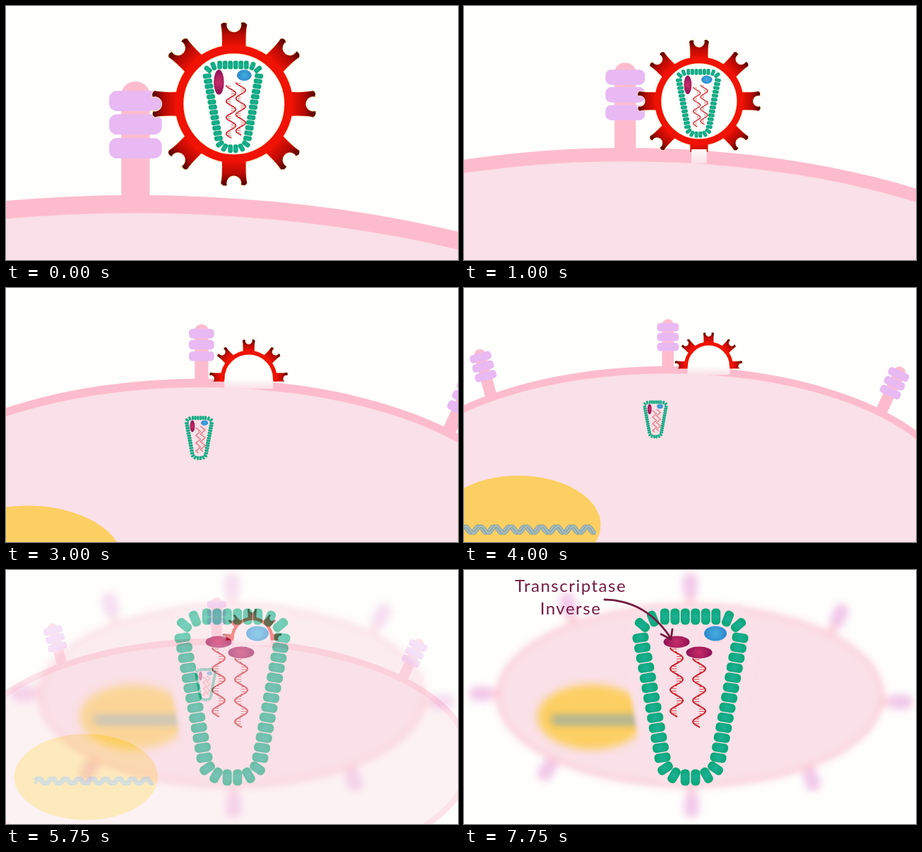
Animation of 640x360 px, one loop 8 s. Source, as an HTML page with a canvas:

```html
<!DOCTYPE html>
<html lang="fr">
<head>
<meta charset="utf-8">
<style>
  html, body { margin: 0; width: 100%; height: 100%; overflow: hidden; background: #fefefc; }
  canvas { display: block; }
</style>
</head>
<body>
<canvas id="stage" width="640" height="360"></canvas>
<script>
const LOOP = 8000, STEP = 250, TAU = Math.PI * 2;
const PAPER = '#fefefc', CELL = '#fae0e8', SKIN = '#fdbccd', INK = '#741c40';
const stage = document.getElementById('stage').getContext('2d');
let ctx = stage;

const mix = (a, b, k) => a + (b - a) * k;
const ramp = (t, from, to) => Math.min(1, Math.max(0, (t - from) / (to - from)));
const smooth = (t, from, to) => { const k = ramp(t, from, to); return k * k * (3 - 2 * k); };

function at(x, y, angle, scale, draw) {
  ctx.save();
  ctx.translate(x, y);
  ctx.rotate(angle * Math.PI / 180);
  ctx.scale(scale, scale);
  draw();
  ctx.restore();
}

function ellipse(x, y, rx, ry, fill) {
  ctx.beginPath();
  ctx.ellipse(x, y, rx, ry, 0, 0, TAU);
  ctx.fillStyle = fill;
  ctx.fill();
}

function pill(x, y, w, h, r, fill) {
  ctx.beginPath();
  ctx.roundRect(x - w / 2, y - h / 2, w, h, r);
  ctx.fillStyle = fill;
  ctx.fill();
}

function gradient(g, ...colors) {
  colors.forEach((c, i) => g.addColorStop(i / (colors.length - 1), c));
  return g;
}

function strokePath(color, width) {
  ctx.strokeStyle = color;
  ctx.lineWidth = width;
  ctx.stroke();
}

// Receptors around the cell: base x, base y, angle
const receptors = [
  [296, 101.5, 0], [70, 138, -15], [569, 157, 25], [-70, 273, -90],
  [665, 289, 90], [40, 387, 212], [519, 402, 161], [299, 451, 180]
];

function receptor() {
  ctx.beginPath();
  ctx.roundRect(-7.5, -61.5, 15, 66, [7, 7, 0, 0]);
  ctx.fillStyle = SKIN;
  ctx.fill();
  for (const y of [-51.3, -38.9, -26.3]) pill(0, y, 27.8, 10.7, 4, '#e9b9f3');
}

function cell() {
  for (const [x, y, angle] of receptors) at(x, y, angle, 1, receptor);
  ellipse(296, 277, 375, 177, SKIN);
  ellipse(296, 277, 366, 167.5, CELL);
}

function nucleus() {
  ellipse(105, 303, 105, 63, '#fccf62');
  for (const phase of [1.3, 0]) {
    ctx.beginPath();
    for (let x = 30; x <= 203; x++) ctx.lineTo(x, 309 - 4.5 * Math.sin((x - 33) / 19.6 * TAU + phase));
    strokePath('#7d9ea6', 4);
    strokePath('#a9bcba', 2.4);
  }
}

function claw() {
  ctx.beginPath();
  ctx.moveTo(-17, -76);
  ctx.quadraticCurveTo(-16, -102, -18.5, -112);
  ctx.quadraticCurveTo(-16, -117, -10, -114);
  ctx.arc(0, -112, 10.5, Math.PI + .3, -.3, true);
  ctx.quadraticCurveTo(16, -117, 18.5, -112);
  ctx.quadraticCurveTo(16, -102, 17, -76);
  strokePath('#ffe9bc', 2);
  ctx.fillStyle = gradient(ctx.createLinearGradient(0, -80, 0, -118), '#f01204', '#b80a04', '#3c0000');
  ctx.fill();
}

function virus(y) {
  const depth = Math.abs(103 - y);
  ctx.save();
  ctx.beginPath();
  ctx.rect(290, -50, 120, 153);
  ctx.clip();
  at(348, y, 0, 1 / 2.68, () => {
    ctx.beginPath();
    ctx.arc(0, 0, 77.5, 0, TAU);
    ctx.fillStyle = PAPER;
    ctx.fill();
    strokePath('#ffe9bc', 14);
    for (let a = 0; a < 360; a += 45) at(0, 0, a, 1, claw);
    ctx.beginPath();
    ctx.arc(0, 0, 77.5, 0, TAU);
    strokePath('#f01204', 12);
  });
  ctx.restore();
  // Opening where the envelope fuses with the membrane
  const half = depth < 27 ? Math.sqrt(729 - depth * depth) : depth < 43 ? 5.4 : 0;
  ctx.fillStyle = gradient(ctx.createLinearGradient(0, 100, 0, 111), PAPER, CELL);
  ctx.fillRect(348 - half, 101, half * 2, 10);
}

function bead(x, y, angle) {
  at(x, y, angle, 1, () =>
    pill(0, 0, 23, 13, 5.5, gradient(ctx.createRadialGradient(0, 0, 0, 0, 0, 12), '#1cb096', '#08a673')));
}

function strand(x, y, scale) {
  at(x, y, 0, scale, () => {
    const wave = v => -9 * Math.cos(v / 30 * TAU);
    ctx.beginPath();
    for (let v = 0; v <= 98; v++) ctx.lineTo(wave(v), v);
    strokePath('#c81c28', 2);
    ctx.beginPath();
    for (let v = 2; v < 98; v += 3.5) {
      ctx.moveTo(wave(v), v);
      ctx.lineTo(0, v);
    }
    strokePath('#d84844', 1);
  });
}

function shell() {
  for (const side of [-1, 1]) {
    const put = (dx, y, angle) => bead(320.5 + side * dx, y, -side * angle);
    for (let i = 0; i < 3; i++) put(7.2 + i * 14.5, 66, 90);
    put(53, 69, 68);
    put(68, 78, 40);
    for (let i = 0; i < 13; i++) put(mix(70.5, 39.5, i / 12), mix(96, 266, i / 12), -9);
    put(35.5, 281, -35);
    put(23, 291, -60);
    put(7.3, 294, -90);
  }
}

const enzyme = (x, y, rx, ry) =>
  ellipse(x, y, rx, ry, gradient(ctx.createRadialGradient(x, y, 0, x, y, Math.max(rx, ry)), '#c82c68', '#8c1254'));

const protein = (x, y, rx, ry) =>
  ellipse(x, y, rx, ry, gradient(ctx.createRadialGradient(x, y, 0, x, y, rx), '#46aede', '#2c86cc'));

function packedCapsid() {
  shell();
  strand(315, 121, 1.47);
  strand(341.5, 113, 1.47);
  enzyme(282, 113, 14, 34);
  protein(351, 94, 20, 15);
}

function openCapsid() {
  shell();
  strand(301, 110, 1);
  strand(333, 125, 1);
  enzyme(301, 102, 18.5, 8.5);
  enzyme(333, 117, 18.5, 8.5);
  protein(356, 90, 16, 10.5);
}

function background() {
  ctx.fillStyle = PAPER;
  ctx.fillRect(0, 0, 640, 360);
}

function approach(t) {
  // The width of the view grows, fastest at two seconds
  const zoom = 1 / (.373 + .143 * t - .00267 * ((t - 2) ** 3 + 8));
  const virusY = mix(51.8, 100, smooth(t, .4, 2));
  const travel = smooth(t, 2, 3.4);
  const capsidX = mix(347.5, 280, travel);
  const capsidY = mix(virusY + 1.5, 168, 1 - (1 - travel) ** 2);

  background();
  at(363 * (1 - zoom), 0, 0, zoom, () => {
    cell();
    virus(virusY);
    nucleus();
    at(capsidX, capsidY, 0, .194, () => {
      ctx.translate(-320.5, -180);
      packedCapsid();
    });
  });
}

function closeUp() {
  background();
  ctx.filter = 'blur(6px)';
  at(104, -24, 0, .73, () => {
    ctx.globalAlpha = .75;
    cell();
    ctx.globalAlpha = 1;
    ellipse(296, 277, 366, 167, CELL);
    ctx.translate(0, 15);
    nucleus();
  });
  // Soft clearing behind the capsid
  ctx.filter = 'blur(3px)';
  ctx.beginPath();
  for (const [x, y] of [[250, 50], [392, 50], [418, 95], [395, 235], [364, 302], [277, 302], [246, 235], [223, 95]]) ctx.lineTo(x, y);
  ctx.fillStyle = CELL;
  ctx.fill();
  ctx.filter = 'none';
  openCapsid();
}

function label(t) {
  const drawn = ramp(t, 6.9, 7.5);
  ctx.save();
  ctx.globalAlpha = ramp(t, 6.4, 7);
  ctx.fillStyle = INK;
  ctx.font = '24px Lato, sans-serif';
  ctx.letterSpacing = '1.5px';
  ctx.textAlign = 'center';
  ctx.fillText('Transcriptase', 151, 31);
  ctx.fillText('Inverse', 151, 63);
  ctx.restore();
  if (!drawn) return;
  const curve = (a, b, c, k) => mix(mix(a, b, k), mix(b, c, k), k);
  ctx.save();
  ctx.lineCap = ctx.lineJoin = 'round';
  ctx.beginPath();
  for (let i = 0; i <= 30; i++) {
    const k = i / 30 * drawn;
    ctx.lineTo(curve(199, 258, 293, k), curve(42, 43, 97, k));
  }
  if (drawn === 1) {
    ctx.moveTo(279, 91);
    ctx.lineTo(293, 98);
    ctx.lineTo(295, 84);
  }
  strokePath(INK, 2.8);
  ctx.restore();
}

// The close-up never moves, so it is painted once
const still = document.createElement('canvas');
still.width = 640;
still.height = 360;
ctx = still.getContext('2d');
closeUp();
ctx = stage;

function render(t) {
  const fade = ramp(t, 5.25, 6.1);
  if (fade < 1) approach(t);
  ctx.globalAlpha = fade;
  ctx.drawImage(still, 0, 0);
  ctx.globalAlpha = 1;
  label(t);
}

function frame() {
  const now = performance.now() % LOOP;
  render(Math.floor(now / STEP) * STEP / 1000);
  requestAnimationFrame(frame);
}
frame();
</script>
</body>
</html>
```
